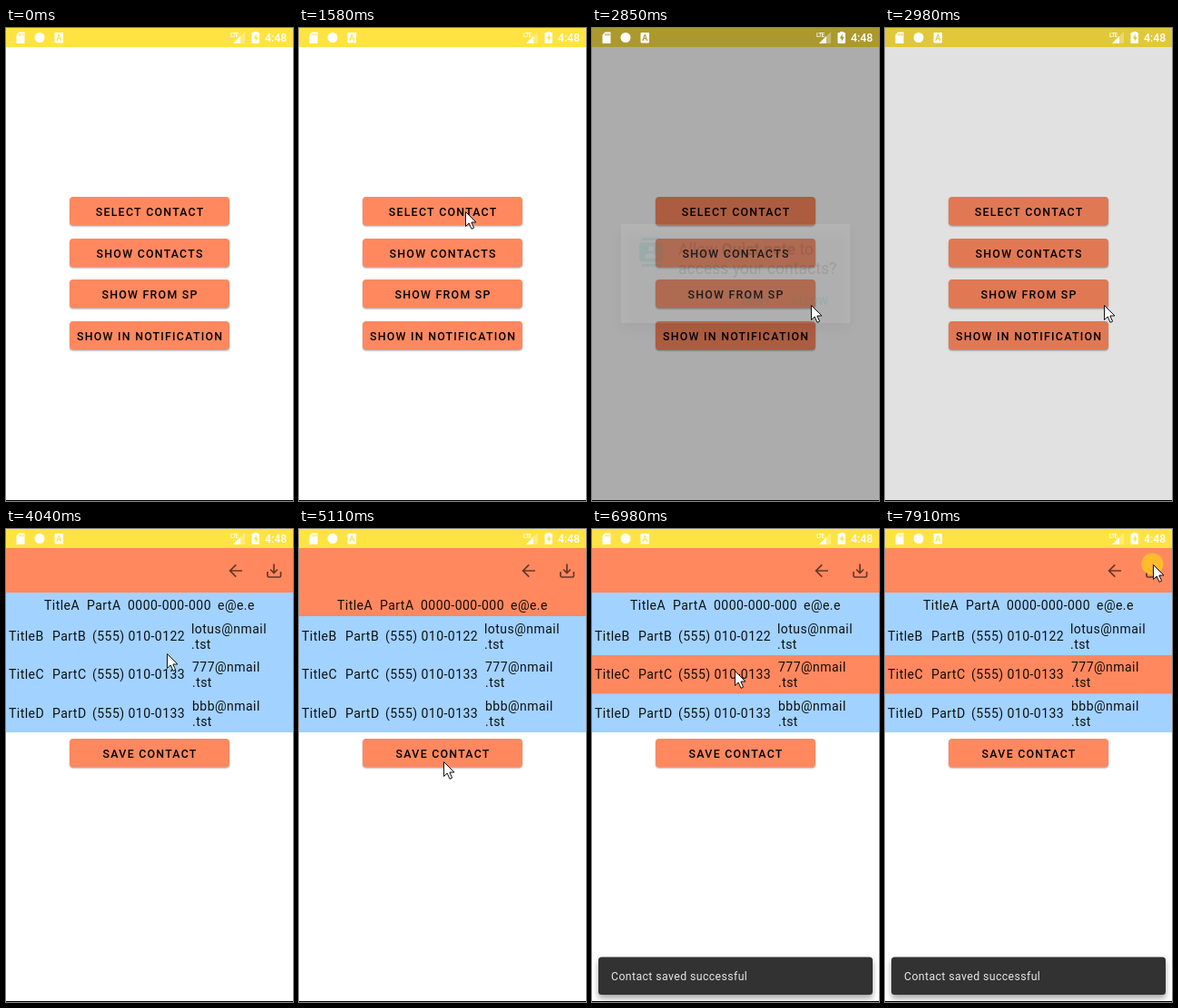
Write an HTML page with a canvas that moves like this. It is 316 px wide and 521 px high and loops after 8000 ms.

```html
<!DOCTYPE html>
<html lang="en">
<head>
<meta charset="utf-8">
<title>Contact picker</title>
<style>
  html, body { margin: 0; width: 100%; height: 100%; overflow: hidden; background: #fff; }
  canvas { display: block; }
</style>
</head>
<body>
<canvas id="stage" width="316" height="521"></canvas>
<script>
const ctx = document.getElementById('stage').getContext('2d');
const LOOP = 8000;
const ORANGE = '#ff885f', BLUE = '#a2d2ff', TEAL = '#009688', INK = 'rgba(0,0,0,.92)';

const CONTACTS_ICON = new Path2D('M20 0H4v2h16V0zM4 24h16v-2H4v2zM20 4H4c-1.1 0-2 .9-2 2v12c0 1.1.9 2 2 2h16c1.1 0 2-.9 2-2V6c0-1.1-.9-2-2-2zm-8 2.75a2.25 2.25 0 1 1 0 4.5a2.25 2.25 0 1 1 0-4.5zM17 17H7v-1.5c0-1.67 3.33-2.5 5-2.5s5 .83 5 2.5V17z');
const TOOL_ICONS = new Path2D('M260 46H247M253.3 39.3L246.6 46L253.3 52.7M295 38.5V48M291 44.5L295 48.5L299 44.5M288 47V51.5Q288 53 289.5 53H301Q302.5 53 302.5 51.5V47');
const ARROW = new Path2D('M.5 .5V16.5L4.2 13L7 19.3L9.6 18.2L6.9 12H12Z');
const SD_CARD = new Path2D('M14.5 4.5H20.5V17H11.5V7.5Z');
const BOLT = new Path2D('M275.8 6.5L272.8 11.5H274.7V15L277.6 10H275.8Z');

// Time, x, y of the pointer tip
const PATH = [
  [440, 279, 473], [1050, 183, 202], [2065, 183, 202], [2130, 183, 213],
  [2560, 241, 305], [3450, 241, 305], [4300, 159, 89], [4560, 159, 89],
  [5100, 159, 256], [6080, 159, 256], [6440, 157, 156], [7050, 157, 156],
  [7700, 295, 39]
];
const CLICKS = [1110, 2580, 4380, 5380, 6580, 7850];
const CLICK_MS = 150;

const ROWS = [
  { top: 70, base: 89, cells: [[42, 'TitleA'], [89, 'PartA'], [134, '0000-000-000'], [233, 'e@e.e']] },
  { top: 96, base: 123, cells: [[3, 'TitleB'], [51, 'PartB'], [95, '(555) 010-0122']], mail: [204, 'lotus@nmail'] },
  { top: 139, base: 165, cells: [[3, 'TitleC'], [51, 'PartC'], [95, '(555) 010-0133']], mail: [205, '777@nmail'] },
  { top: 181.5, base: 208, cells: [[3, 'TitleD'], [51, 'PartD'], [95, '(555) 010-0133']], mail: [205, 'bbb@nmail'] }
];
const LIST_END = 224;

const clamp = v => Math.min(1, Math.max(0, v));
const smooth = v => v * v * (3 - 2 * v);
const ramp = (t, from, to) => smooth(clamp((t - from) / (to - from)));

function text(str, x, y, { size = 12.3, weight = 400, color = INK, spacing = 0, align = 'left' } = {}) {
  ctx.font = `${weight} ${size}px Roboto, sans-serif`;
  ctx.letterSpacing = spacing + 'px';
  ctx.textAlign = align;
  ctx.fillStyle = color;
  ctx.fillText(str, x, y);
  return x + ctx.measureText(str).width;
}

function rect(x, y, w, h, color) {
  ctx.fillStyle = color;
  ctx.fillRect(x, y, w, h);
}

function box(x, y, w, h, r, color, blur = 0, drop = blur / 2) {
  ctx.save();
  if (blur) {
    ctx.shadowColor = 'rgba(0,0,0,.35)';
    ctx.shadowOffsetY = drop;
    ctx.shadowBlur = blur;
  }
  ctx.fillStyle = color;
  ctx.beginPath();
  ctx.roundRect(x, y, w, h, r);
  ctx.fill();
  ctx.restore();
}

// Fade and grow a panel around its centre
function popIn(alpha, scale, cx, cy, draw) {
  if (alpha <= 0) return;
  ctx.save();
  ctx.globalAlpha = alpha;
  ctx.translate(cx, cy);
  ctx.scale(scale, scale);
  ctx.translate(-cx, -cy);
  draw();
  ctx.restore();
}

function button(label, y, pressed = 0) {
  box(70, y, 176, 31.3, 4, ORANGE, 1.8, 1.2);
  if (pressed) box(70, y, 176, 31.3, 4, `rgba(0,0,0,${pressed})`);
  text(label, 158.6, y + 20.7, { size: 12.4, weight: 500, color: '#000', spacing: 1.25, align: 'center' });
}

function menuScreen() {
  ['SELECT CONTACT', 'SHOW CONTACTS', 'SHOW FROM SP', 'SHOW IN NOTIFICATION']
    .forEach((label, i) => button(label, Math.round(186 + i * 45.7)));
}

function listScreen(t) {
  rect(0, 21, 316, 49, ORANGE);
  ctx.strokeStyle = 'rgba(0,0,0,.6)';
  ctx.lineWidth = 1.7;
  ctx.stroke(TOOL_ICONS);

  const selected = t < 4450 ? -1 : t < 6650 ? 0 : 2;
  const style = { size: 14.05, spacing: .44 };
  ROWS.forEach(({ top, base, cells, mail }, i) => {
    // Each row paints down to the list end so that row borders stay opaque
    rect(0, top, 316, LIST_END - top, i === selected ? ORANGE : BLUE);
    cells.forEach(([x, str]) => text(str, x, base, style));
    if (mail) {
      text(mail[1], mail[0], base - 8, style);
      text('.tst', mail[0], base + 8.5, style);
    }
  });

  button('SAVE CONTACT', 231, .05 * ramp(t, 5400, 5550) * (1 - ramp(t, 6240, 6500)));
  const shown = ramp(t, 5520, 5750);
  popIn(shown, .8 + .2 * shown, 158, 492, () => {
    box(7, 471.5, 302, 41.5, 3.5, '#323232', 6, 4);
    text('Contact saved successful', 21, 497, { color: '#e6e6e6', spacing: .4 });
  });
}

function dialog() {
  box(32, 216, 252, 109, 1.5, '#fff', 14);
  ctx.save();
  ctx.translate(49.2, 231);
  ctx.scale(1.32, 1.32);
  ctx.fillStyle = TEAL;
  ctx.fill(CONTACTS_ICON, 'evenodd');
  ctx.restore();
  const size = 17.56;
  let x = text('Allow ', 95, 250, { size });
  x = text('Quiet note', x, 250, { size, weight: 700 });
  text(' to', x, 250, { size });
  text('access your contacts?', 95, 271, { size });
  text('DENY', 165.5, 305, { weight: 500, color: TEAL });
  text('ALLOW', 219.5, 305, { weight: 500, color: TEAL });
}

function triangle(x, y, size, color) {
  ctx.fillStyle = color;
  ctx.beginPath();
  ctx.moveTo(x, y);
  ctx.lineTo(x + size, y);
  ctx.lineTo(x + size, y - size);
  ctx.fill();
}

function statusIcons(dim) {
  const bar = `rgb(${[255, 227, 66].map(c => Math.round(c * (1 - dim)))})`;
  ctx.fillStyle = '#fff';
  ctx.fill(SD_CARD);
  [14.5, 16.5, 18.5].forEach(x => rect(x, 6, 1, 2.5, bar));
  ctx.fillStyle = '#fff';
  ctx.beginPath();
  ctx.arc(37, 10.5, 5.5, 0, 7);
  ctx.fill();
  box(53.5, 5, 9.5, 11.5, 1, '#fff');
  text('A', 58.3, 14, { size: 9, weight: 700, color: bar, align: 'center' });
  triangle(250, 17, 13, 'rgba(255,255,255,.3)');
  triangle(250, 17, 8, '#fff');
  text('LTE', 247, 10, { size: 6.5, weight: 500, color: '#fff', spacing: -.6 });
  rect(273, 4, 4, 2, '#fff');
  box(270.5, 5, 8.5, 12, 1, '#fff');
  ctx.fillStyle = bar;
  ctx.fill(BOLT);
  text('4:48', 285, 15, { weight: 500, color: '#fff' });
}

function pointer(t) {
  if (t < PATH[0][0]) return;
  const next = PATH.findIndex(key => key[0] > t);
  const b = PATH[next < 0 ? PATH.length - 1 : next];
  const a = next < 0 ? b : PATH[next - 1];
  const k = ramp(t, a[0], b[0]) || 0;
  const x = Math.round(a[1] + (b[1] - a[1]) * k);
  const y = Math.round(a[2] + (b[2] - a[2]) * k);

  if (CLICKS.some(c => t >= c && t < c + CLICK_MS)) {
    ctx.fillStyle = 'rgba(255,196,36,.85)';
    ctx.beginPath();
    ctx.arc(x - .6, y - .6, 12, 0, 7);
    ctx.fill();
  }
  ctx.save();
  ctx.translate(x, y);
  ctx.fillStyle = '#fff';
  ctx.fill(ARROW);
  ctx.strokeStyle = '#111';
  ctx.lineWidth = 1;
  ctx.stroke(ARROW);
  ctx.restore();
}

function draw(t) {
  rect(0, 0, 316, 521, '#fff');
  rect(0, 0, 316, 21, '#ffe342');
  if (t < 3050) menuScreen();
  else listScreen(t);

  const dim = t < 2680 ? .6 * ramp(t, 1570, 1930) : .6 * clamp((3055 - t) / 375);
  if (dim) rect(0, 0, 316, 521, `rgba(0,0,0,${dim})`);
  const opened = ramp(t, 1620, 1860);
  popIn(opened * (1 - ramp(t, 2700, 2890)), .9 + .1 * opened, 158, 270, dialog);

  statusIcons(dim);
  rect(0, 520, 316, 1, '#000');
  pointer(t);
}

function tick() {
  draw(performance.now() % LOOP);
  requestAnimationFrame(tick);
}
tick();
</script>
</body>
</html>
```
